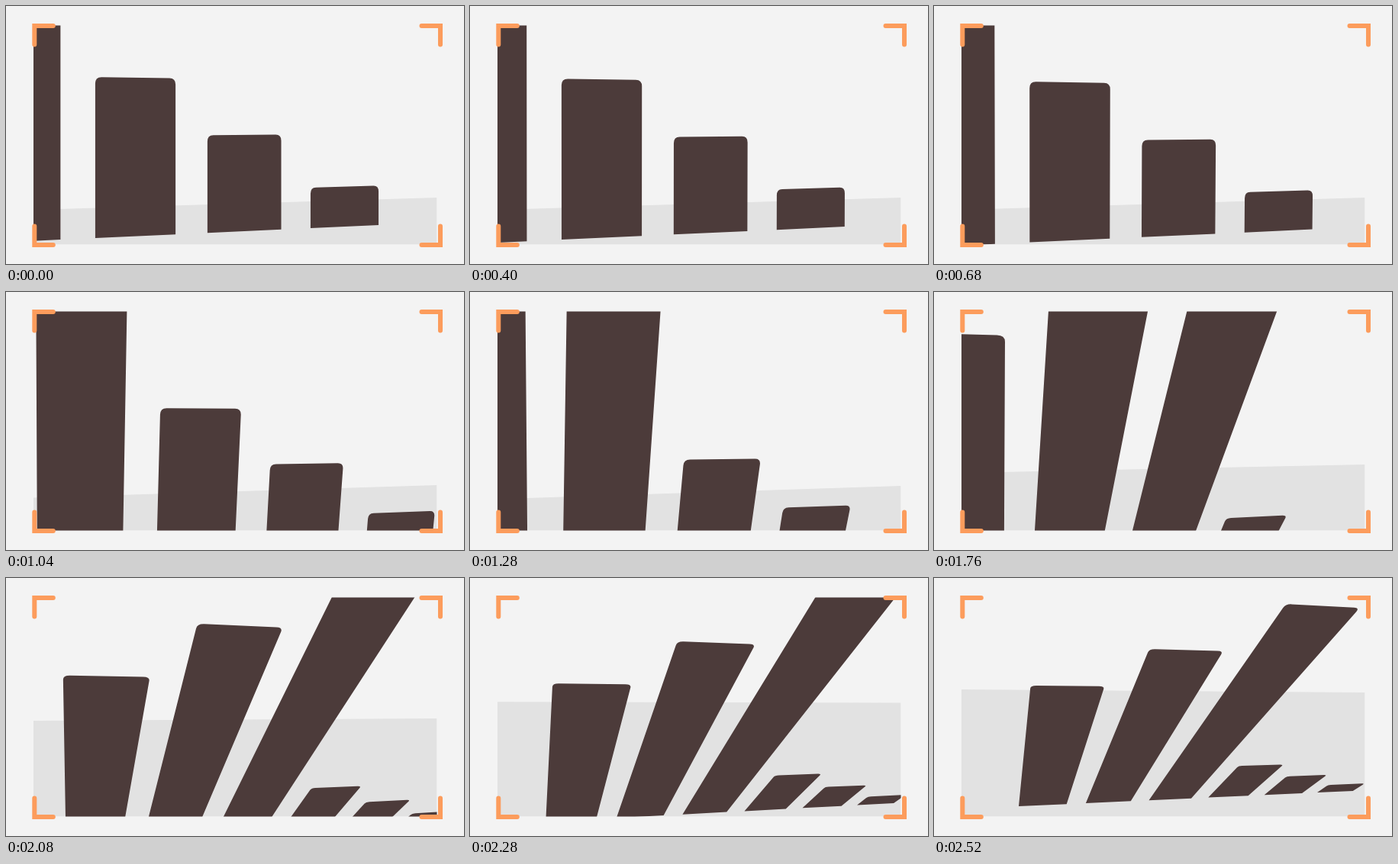
An HTML page with a canvas for the animation above (2920 ms loop, 600 px wide and 338 px high).

```html
<!DOCTYPE html>
<html lang="en">
<head>
<meta charset="utf-8">
<title>Bar chart camera move</title>
<style>
  html, body { margin: 0; width: 100%; height: 100%; overflow: hidden; background: #f3f3f3; }
  canvas { display: block; width: 600px; height: 338px; }
</style>
</head>
<body>
<canvas id="stage" width="600" height="338"></canvas>
<script>
const ctx = document.getElementById('stage').getContext('2d');
const LOOP = 2920, END = 2520, STEP = 40;
const COLORS = { page: '#f3f3f3', floor: '#e2e2e2', bar: '#4c3b3a', bracket: '#fc9c5c' };
const VIEW = { left: 36, top: 25.5, right: 564.5, bottom: 312.5 };

// Bars stand one unit apart on a flat wall seen through a moving camera.
const HEIGHTS = [5.565, 6.61, 7.73, 2.11, 1.337, 0.578];
const BAR_WIDTH = 0.707;
const ROUND = { u: 0.055, v: 0.085 };

// Each camera key: x = (a u + b v + c) / w, y = (d u + e v + f) / w, w = 1 + g u + h v,
// followed by the floor edge height at the left and right of the view.
const TIMES = [0, 680, 1040, 1280, 1760, 2080, 2520];
const KEYS = [
  [182.7, 0, -413.4, 7.32, -115.2, 328.3, 0.0507, 0, 267, 251],
  [182.7, -0.5, -403.7, 7.62, -115.2, 333.8, 0.0507, -0.0034, 267, 251],
  [181.6, -1.38, -318, 8.76, -113.5, 381.7, 0.0507, -0.0211, 269.5, 253],
  [175.9, -4.3, -216.8, 11.3, -108, 430.5, 0.0588, -0.0469, 271.3, 254],
  [126.2, -6.1, 4.7, 5.6, -68.7, 415, 0.0375, -0.0686, 237, 226],
  [107.4, -5.75, 78.6, 6.6, -48.6, 350, 0.038, -0.0677, 187, 184],
  [94.26, -5.5, 111, 5.41, -37.63, 299, 0.032, -0.0655, 146, 150]
];

const slope = (i, n) => (KEYS[i + 1][n] - KEYS[i][n]) / (TIMES[i + 1] - TIMES[i]);

// Tangent at a key: still at both ends, no overshoot on steady runs, smooth at turns.
function tangent(i, n) {
  if (i === 0 || i === KEYS.length - 1) return 0;
  const before = slope(i - 1, n), after = slope(i, n);
  if (before * after > 0) return 2 * before * after / (before + after);
  if (before * after === 0) return 0;
  const p = TIMES[i] - TIMES[i - 1], q = TIMES[i + 1] - TIMES[i];
  return (before * q + after * p) / (p + q);
}

function cameraAt(time) {
  let i = 0;
  while (i < TIMES.length - 2 && time >= TIMES[i + 1]) i++;
  const span = TIMES[i + 1] - TIMES[i];
  const s = (time - TIMES[i]) / span, r = 1 - s;
  return KEYS[i].map((from, n) =>
    from * (1 + 2 * s) * r * r +
    KEYS[i + 1][n] * s * s * (3 - 2 * s) +
    span * s * r * (tangent(i, n) * r - tangent(i + 1, n) * s));
}

function drawBar(project, left, height) {
  const right = left + BAR_WIDTH;
  const line = (u, v) => ctx.lineTo(...project(u, v));
  const corner = (u, v, endU, endV) =>
    ctx.quadraticCurveTo(...project(u, v), ...project(endU, endV));
  ctx.beginPath();
  ctx.moveTo(...project(left, 0));
  line(left, height - ROUND.v);
  corner(left, height, left + ROUND.u, height);
  line(right - ROUND.u, height);
  corner(right, height, right, height - ROUND.v);
  line(right, 0);
  ctx.fill();
}

function drawBracket(x, y, dx, dy) {
  ctx.beginPath();
  ctx.moveTo(x, y + dy);
  ctx.lineTo(x, y);
  ctx.lineTo(x + dx, y);
  ctx.stroke();
}

function draw(time) {
  const [a, b, c, d, e, f, g, h, floorLeft, floorRight] = cameraAt(time);
  const project = (u, v) => {
    const w = 1 + g * u + h * v;
    return [(a * u + b * v + c) / w, (d * u + e * v + f) / w];
  };

  ctx.fillStyle = COLORS.page;
  ctx.fillRect(0, 0, 600, 338);

  ctx.save();
  ctx.beginPath();
  ctx.rect(VIEW.left, VIEW.top, VIEW.right - VIEW.left, VIEW.bottom - VIEW.top);
  ctx.clip();

  ctx.fillStyle = COLORS.floor;
  ctx.beginPath();
  ctx.moveTo(VIEW.left, floorLeft);
  ctx.lineTo(VIEW.right, floorRight);
  ctx.lineTo(VIEW.right, VIEW.bottom);
  ctx.lineTo(VIEW.left, VIEW.bottom);
  ctx.fill();

  ctx.fillStyle = COLORS.bar;
  HEIGHTS.forEach((height, i) => drawBar(project, i, height));
  ctx.restore();

  ctx.strokeStyle = COLORS.bracket;
  ctx.lineWidth = 6;
  ctx.lineCap = 'round';
  ctx.lineJoin = 'miter';
  drawBracket(37.3, 26, 24.5, 24.5);
  drawBracket(569, 26, -24.5, 24.5);
  drawBracket(37.3, 313, 24.5, -24.5);
  drawBracket(569, 313, -24.5, -24.5);
}

function tick(now) {
  const time = Math.floor((now % LOOP) / STEP) * STEP;
  draw(Math.min(time, END));
  requestAnimationFrame(tick);
}

draw(0);
requestAnimationFrame(tick);
</script>
</body>
</html>
```
